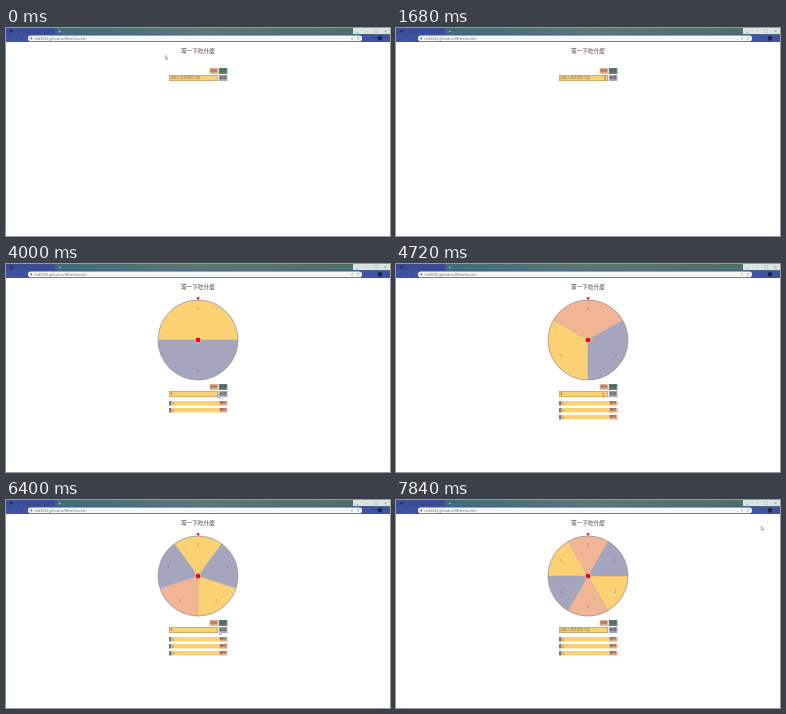
Recreate the animation shown at these times as an HTML page with a canvas. Size 384 px wide and 208 px high, loop 7.92 s.

```html
<!DOCTYPE html>
<html lang="zh-Hant">
<head>
<meta charset="utf-8">
<title>等一下吃什麼</title>
<style>
html, body { margin: 0; width: 100%; height: 100%; overflow: hidden; background: #fff; }
canvas { display: block; width: 384px; height: 208px; }
</style>
</head>
<body>
<canvas id="stage" width="384" height="208"></canvas>
<script>
const ctx = document.getElementById('stage').getContext('2d');
const LOOP = 7920, STEP = 80;
const LAV = '#a5a5be', YEL = '#fcd173', SAL = '#f1b595', GREEN = '#638775';
const FONT = '"Noto Sans CJK TC", "Noto Sans CJK", sans-serif';
const WHEEL = { x: 192, y: 76, r: 40 };

// Moments at which each dish is added
const adds = [2320, 3360, 4160, 4960, 5760, 6480];

// Pointer path: time, x, y
const path = [[0, 160, 29], [80, 160, 29], [320, 184, 91], [720, 205, 50], [1680, 209, 50],
  [2080, 209, 50], [2240, 216, 51], [2320, 216, 51], [2480, 214, 130]];
adds.slice(0, -1).forEach((t, i) => {
  const next = adds[i + 1];
  if (i) path.push([t + 80, 214, 132]);
  path.push([t + 400, i ? 206 : 197, i ? 132 : 130], [next - 280, i ? 206 : 197, 131], [next - 120, 214, 132]);
});
path.push([7200, 214, 132], [7680, 366, 28], [LOOP, 366, 28]);

function rect(x, y, w, h, fill) {
  ctx.fillStyle = fill;
  ctx.fillRect(x, y, w, h);
}

function text(s, x, y, size, color, align = 'center') {
  ctx.font = size + 'px ' + FONT;
  ctx.textAlign = align;
  ctx.textBaseline = 'middle';
  ctx.fillStyle = color;
  ctx.fillText(s, x, y);
}

function disc(x, y, r, fill) {
  ctx.beginPath();
  ctx.arc(x, y, r, 0, Math.PI * 2);
  ctx.fillStyle = fill;
  ctx.fill();
}

function poly(points, fill) {
  ctx.beginPath();
  points.forEach(p => ctx.lineTo(p[0], p[1]));
  ctx.closePath();
  ctx.fillStyle = fill;
  ctx.fill();
}

function line(x1, y1, x2, y2, color, width = 0.6) {
  ctx.beginPath();
  ctx.moveTo(x1, y1);
  ctx.lineTo(x2, y2);
  ctx.strokeStyle = color;
  ctx.lineWidth = width;
  ctx.stroke();
}

function button(label, x, y, fill, h = 6) {
  rect(x, y, 8.6, h, fill);
  text(label, x + 4.3, y + h / 2, 3.4, '#4b3537');
}

function header() {
  const strip = ctx.createLinearGradient(0, 0, 384, 0);
  strip.addColorStop(0, '#3f5499');
  strip.addColorStop(0.16, '#436d77');
  strip.addColorStop(0.5, '#5a7871');
  strip.addColorStop(0.9, '#4d7069');
  strip.addColorStop(1, '#63837a');
  rect(0, 0, 384, 7, strip);
  rect(0, 0, 49, 7, '#3b4c97');
  rect(0, 6.5, 384, 7.5, '#4054a3');
  disc(5.5, 3, 1.5, '#26345f');
  text('+', 54, 3, 5, '#d8ecd5');
  rect(347, 0, 37, 6, '#dce4e2');
  for (let i = 0; i < 4; i++) text(['⌄', '–', '□', '×'][i], 351.5 + i * 9.3, 3, 4, '#59696a');
  text('←  →  ↻', 10, 10.3, 4, '#2d3d82');
  ctx.beginPath();
  ctx.roundRect(22, 7.6, 334, 5.6, 2.8);
  ctx.fillStyle = '#f4f6f8';
  ctx.fill();
  disc(25.3, 10.4, 1.1, '#777d84');
  text('lin83052.github.io/WheelLunch/', 28.5, 10.5, 3.5, '#6b7078', 'left');
  text('⇪', 346, 10.4, 4, '#777');
  text('☆', 352, 10.4, 4, '#777');
  disc(374, 10.3, 2.2, '#17253f');
  text('⋮', 381, 10.3, 4.5, '#1d2b58');
}

function sliceColor(i, n) {
  const cycle = [LAV, YEL, SAL];
  return n > 1 && i === n - 1 && i % 3 === 0 ? YEL : cycle[i % 3];
}

function wheel(n) {
  const { x, y, r } = WHEEL, part = Math.PI * 2 / n;
  const mid = i => (i + 1) * part - Math.PI / 2;
  for (let i = 0; i < n; i++) {
    ctx.beginPath();
    if (n > 1) ctx.moveTo(x, y);
    ctx.arc(x, y, r, mid(i) - part / 2, mid(i) + part / 2);
    ctx.closePath();
    ctx.fillStyle = sliceColor(i, n);
    ctx.fill();
  }
  for (let i = 0; i < n; i++) {
    const a = mid(i), edge = a - part / 2;
    if (n > 1) line(x, y, x + r * Math.cos(edge), y + r * Math.sin(edge), '#a39a94', 0.4);
    text(String(i + 1), x + 31 * Math.cos(a), y + 31 * Math.sin(a), 3.5, '#6f6f80');
  }
  ctx.beginPath();
  ctx.arc(x, y, r, 0, Math.PI * 2);
  ctx.strokeStyle = '#8d8b97';
  ctx.lineWidth = 0.7;
  ctx.stroke();
  disc(x, y, 3.2, '#f5d9d5');
  disc(x, y, 2.5, '#ee0b0b');
  poly([[190.2, 32.8], [192, 33.6], [194, 32.8], [192.2, 36.4]], '#e81818');
}

function form(y, typed) {
  button('開始', 203.6, y, SAL);
  button('重置', 212.8, y, GREEN);
  rect(163, y + 7, 49, 6, '#a18d67');
  rect(163.5, y + 7.5, 48, 5, YEL);
  if (typed) text(typed, 164.6, y + 10, 3.5, '#4b3537', 'left');
  else text('請輸入要新增的內容', 164.3, y + 10, 3.3, '#8b7c58', 'left');
  button('新增', 212.8, y + 7, LAV);
}

function list(n) {
  for (let i = 0; i < Math.min(n, 3); i++) {
    const y = 137 + i * 7;
    rect(163, y, 58.4, 4.4, YEL);
    rect(163, y, 2.4, 4.4, '#77779b');
    text(String(i + 1), 166.2, y + 2.3, 3.2, '#66593f', 'left');
    button('刪除', 212.8, y, SAL, 4.4);
  }
}

function pointerAt(t) {
  const k = path.findIndex(p => p[0] > t);
  const [t0, x0, y0] = path[k - 1], [t1, x1, y1] = path[k];
  const u = (t - t0) / (t1 - t0), e = u * u * (3 - 2 * u);
  return [x0 + (x1 - x0) * e, y0 + (y1 - y0) * e];
}

function pointer(t, top) {
  const [x, y] = pointerAt(t);
  if (x > 163 && x < 212 && y > top + 7 && y < top + 13) {
    line(x, y - 2, x, y + 2, '#55513f', 0.5);
    line(x - 0.8, y - 2, x + 0.8, y - 2, '#55513f', 0.4);
    line(x - 0.8, y + 2, x + 0.8, y + 2, '#55513f', 0.4);
    return;
  }
  const shape = [[0, 0], [0, 4], [0.9, 3.2], [1.5, 4.6], [2.1, 4.3], [1.5, 3], [2.8, 2.9]];
  poly(shape.map(p => [x - 0.8 + p[0], y - 1.8 + p[1]]), '#fff');
  ctx.strokeStyle = '#777';
  ctx.lineWidth = 0.5;
  ctx.stroke();
}

function draw(t) {
  const n = adds.filter(a => t >= a).length;
  const typed = n < adds.length && t >= adds[n] - 240 ? String(n + 1) : '';
  const top = n ? 120 : 40;
  rect(0, 0, 384, 208, '#fff');
  header();
  text('等一下吃什麼', 192, 22.6, 5.7, '#4a3434');
  if (n) {
    wheel(n);
    list(n);
  }
  form(top, typed);
  pointer(t, top);
}

function tick() {
  draw(Math.floor(performance.now() % LOOP / STEP) * STEP);
  requestAnimationFrame(tick);
}
tick();
</script>
</body>
</html>
```
